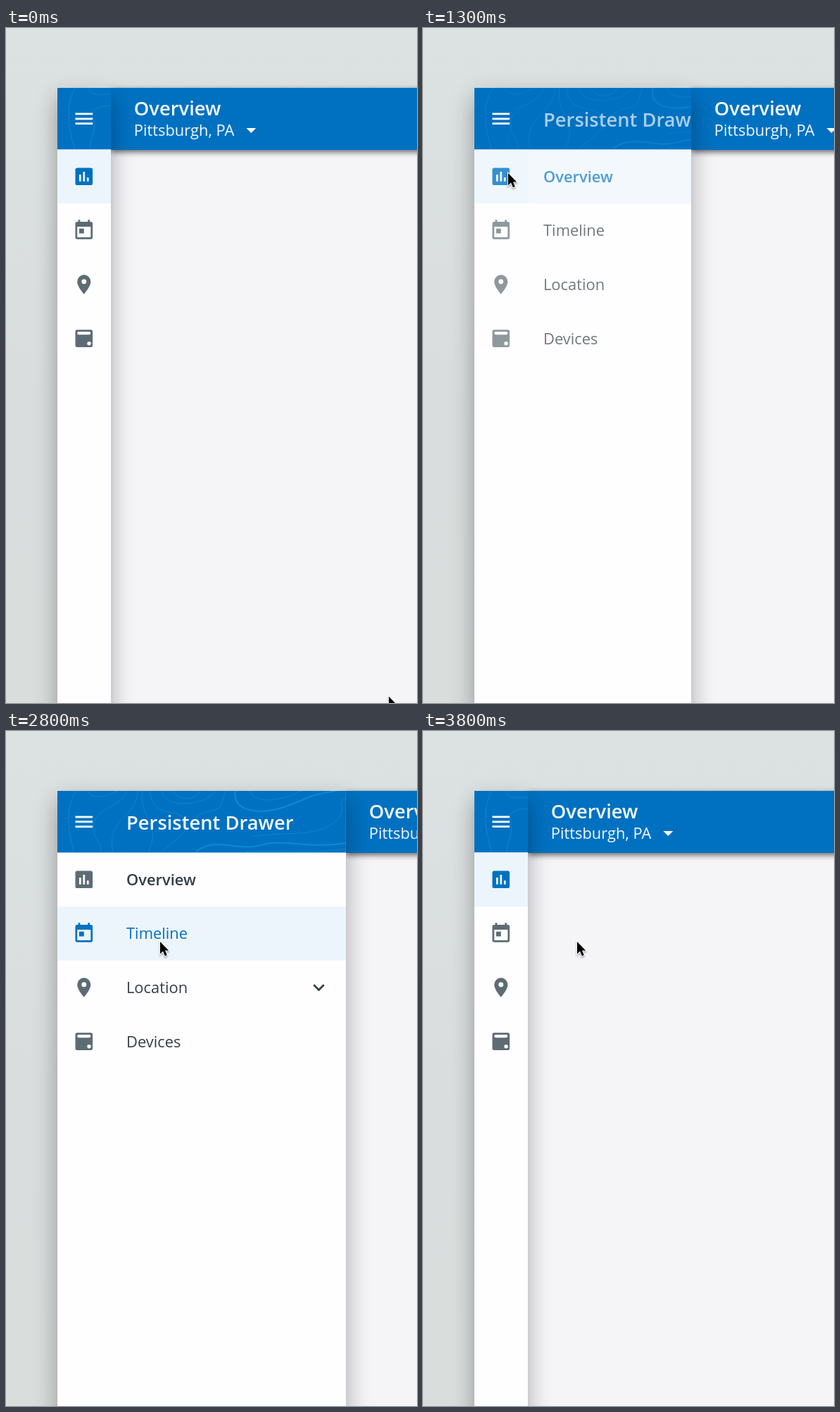
Animation of 584 by 958 pixels, one loop 4400 ms. Source, as an HTML page:

```html
<!DOCTYPE html>
<html lang="en">
<head>
<meta charset="utf-8">
<title>Persistent drawer</title>
<style>
  html, body { margin: 0; width: 100%; height: 100%; overflow: hidden; }
  body { position: relative; background: linear-gradient(#dce1e1, #d9dddd 55%, #d9dedd); }
  div, svg { position: absolute; }
  svg { overflow: visible; font-family: "Open Sans", sans-serif; }
  #page { top: 85px; width: 600px; height: 900px; background: #f5f4f7; }
  #bar { width: 100%; height: 87.5px; background: #0071c1; box-shadow: 0 3px 8px rgba(0, 0, 0, .6); }
  #drawer { left: 72.5px; top: 85px; height: 920px; overflow: hidden; background: #fefdff;
    box-shadow: 0 14px 32px rgba(0, 0, 0, .33); }
  #drawer svg { left: -72.5px; top: -85px; }
  .title { font-size: 27.36px; font-weight: 600; fill: #f4f9fd; }
  .label { font-size: 21.9px; }
  .contours path { fill: none; stroke: #1583cb; stroke-width: 1; }
  .contours .bold { stroke: #0e8bd5; stroke-width: 1.8; }
  #cursor { filter: drop-shadow(0 2px 1px rgba(0, 0, 0, .3)); }
</style>
</head>
<body>
<div id="page">
  <div id="bar">
    <svg width="500" height="88">
      <text class="title" x="32.8" y="38.5">Overview</text>
      <text class="label" x="32.8" y="67.5" fill="#f4f9fd">Pittsburgh, PA</text>
      <path d="M192.5 57h13.8l-6.9 6.9z" fill="#fff"/>
    </svg>
  </div>
</div>
<div id="drawer"><svg id="panel" width="584" height="958"></svg></div>
<svg id="cursor" width="40" height="40">
  <path id="arrow" d="M0 0V17.2L4 13.6L6.9 20.2L9.8 18.9L7 12.4H12.2Z"
    fill="#000" stroke="#fff" stroke-width="1.8" paint-order="stroke"/>
  <g id="hand" stroke-linejoin="round" stroke-linecap="round">
    <path d="M-2.4 2.6C-3.2-.6.8-1.6 1.9 1.4L4 7.6C5 6 7.3 6.4 7.7 8.2C9 6.9 10.8 7.6 11.1 9.2C12.4 8.6 13.6 9.6 13.6 11C14 15 12.6 17 11.6 19V22H2V19.6C-.5 17.4-2.6 14.8-5 12.4C-7 10-4 8.2-2 10.2L-.4 11.6Z"
      fill="#fff" stroke="#000" stroke-width="1.6"/>
    <path d="M3.6 14v4.5M6.3 14v4.5M9 14v4.5" stroke="#000" stroke-width="1.2"/>
  </g>
</svg>
<script>
const LOOP = 4400, LEFT = 72.5, UNIT = 1.368;
const ROW = 56 * UNIT, FIRST_ROW = 172.5, MINI = 56 * UNIT, WIDE = 300 * UNIT;
const BLUE = '#0071c1', GRAY = '#5d6c74', INK = '#343e43', TINT = '#ecf5fb';
const $ = id => document.getElementById(id);

const ICONS = {
  menu: 'M3 18h18v-2H3zm0-5h18v-2H3zm0-7v2h18V6z',
  chart: 'M19 3H5a2 2 0 0 0-2 2v14a2 2 0 0 0 2 2h14a2 2 0 0 0 2-2V5a2 2 0 0 0-2-2zM9 17H7v-7h2zm4 0h-2V7h2zm4 0h-2v-4h2z',
  calendar: 'M19 3h-1V1h-2v2H8V1H6v2H5a2 2 0 0 0-2 2v14a2 2 0 0 0 2 2h14a2 2 0 0 0 2-2V5a2 2 0 0 0-2-2zm0 16H5V8h14zM7 10h5v5H7z',
  pin: 'M12 2a7 7 0 0 0-7 7c0 5.25 7 13 7 13s7-7.75 7-13a7 7 0 0 0-7-7zm0 9.5a2.5 2.5 0 1 1 0-5 2.5 2.5 0 0 1 0 5z',
  device: 'M5 3h14a2 2 0 0 1 2 2v14a2 2 0 0 1-2 2H5a2 2 0 0 1-2-2V5a2 2 0 0 1 2-2zM6.5 5a1.5 1.5 0 0 0 0 3h11a1.5 1.5 0 0 0 0-3zM17.3 15.2a2 2 0 1 0 0 4 2 2 0 0 0 0-4z',
  help: 'M5 3h14a2 2 0 0 1 2 2v14a2 2 0 0 1-2 2H5a2 2 0 0 1-2-2V5a2 2 0 0 1 2-2zM11 16v2h2v-2zM8 10h2a2 2 0 1 1 3 1.6q-2 1-2 3.4h2q0-1.300 1.400-2.200A4 4 0 1 0 8 10z',
  gavel: 'M1 21h12v2H1zM5.200 8.100l2.800-2.900 14.200 14.200-2.900 2.800zM12.300 1l5.700 5.700-2.900 2.800-5.600-5.700zM3.800 9.500l5.700 5.700-2.900 2.800L1 12.300z',
  settings: 'M5 3h14a2 2 0 0 1 2 2v14a2 2 0 0 1-2 2H5a2 2 0 0 1-2-2V5a2 2 0 0 1 2-2zM12 8a4 4 0 1 0 0 8 4 4 0 0 0 0-8z',
  chevron: 'M16.590 8.590L12 13.170 7.410 8.590 6 10l6 6 6-6z'
};
const rowCenter = i => FIRST_ROW + (i + .5) * ROW;
const icon = (name, y, color = GRAY, x = LEFT + MINI / 2, id = '') =>
  `<path id="${id}" d="${ICONS[name]}" fill="${color}" fill-rule="evenodd"
    transform="translate(${x - 12 * UNIT} ${y - 12 * UNIT}) scale(${UNIT})"/>`;
const label = (text, y, id = '', weight = 400) =>
  `<text id="${id}" class="label" x="171" y="${y + 8}" font-weight="${weight}" fill="${INK}">${text}</text>`;
const tint = (i, width, id = '') =>
  `<rect id="${id}" x="${LEFT}" y="${FIRST_ROW + i * ROW}" width="${width}" height="${ROW}" fill="${TINT}"/>`;
const contours = (thin, bold = []) => '<g class="contours">' +
  thin.map(d => `<path d="${d}"/>`).join('') +
  bold.map(d => `<path class="bold" d="${d}"/>`).join('') + '</g>';

const wideContours = contours([
  'M100 85C84 108 87 140 97 172', 'M118 85C119 98 142 94 158 85',
  'M172 85C165 108 128 108 125 132S138 156 134 172', 'M187 85C186 124 142 122 152 172',
  'M205 85C205 124 244 108 254 126S236 156 222 172', 'M194 85C188 124 222 132 202 172',
  'M222 85C224 112 284 106 298 85', 'M238 85C246 101 270 98 276 85',
  'M270 122C290 108 306 118 308 96L312 85', 'M338 172C370 166 424 176 483 167',
  'M350 150C390 142 440 152 466 130S464 102 483 96', 'M346 85C352 104 390 100 420 85'
], [
  'M270 171C300 149 330 172 362 162S430 168 483 159',
  'M326 85C322 112 352 118 384 111S424 90 470 85'
]);
const miniContours = contours([
  'M98 85C85 108 87 138 98 172', 'M118 85C120 97 132 94 149 94',
  'M149 110C120 112 122 120 125 134S118 158 120 172'
]);

// Each secondary entry trades places with a collapsed entry in the narrow drawer.
const SWAPS = [['calendar', 'help', 'Help'], ['pin', 'gavel', 'Legal'], ['device', 'settings', 'Settings']];
const swapGroup = (kind, draw) =>
  SWAPS.map((s, i) => `<g id="${kind}${i}">${draw(s)}</g>`).join('');

$('panel').innerHTML = `
  <rect x="${LEFT}" y="85" width="${WIDE}" height="87.5" fill="${BLUE}"/>
  <g id="wide">
    ${wideContours}
    <text class="title" x="171" y="139.500">Persistent Drawer</text>
    ${tint(0, WIDE, 'overviewTint')}${tint(1, WIDE, 'timelineTint')}
    ${icon('chart', rowCenter(0), GRAY, undefined, 'overviewIcon')}${label('Overview', rowCenter(0), 'overviewText', 600)}
    ${icon('calendar', rowCenter(1), GRAY, undefined, 'timelineIcon')}${label('Timeline', rowCenter(1), 'timelineText')}
    ${icon('pin', rowCenter(2))}${label('Location', rowCenter(2))}
    ${icon('chevron', rowCenter(2), GRAY, 444.5, 'chevron')}
    ${icon('device', rowCenter(3))}${label('Devices', rowCenter(3))}
    ${swapGroup('extra', s => icon(s[1], 0) + label(s[2], 0))}
  </g>
  <g id="mini">
    ${miniContours}${tint(0, MINI)}${icon('chart', rowCenter(0), BLUE)}
    ${swapGroup('small', s => icon(s[0], 0))}
  </g>
  ${icon('menu', 128.800, '#fff')}`;

// time, x, y of the pointer tip
const PATH = [
  [0, 544, 949], [100, 537, 934], [200, 500, 852], [300, 415, 672], [400, 300, 440],
  [500, 215, 288], [600, 173, 225], [700, 143, 213], [900, 121, 210], [1200, 121, 206],
  [1500, 121, 206], [1600, 136, 229], [1700, 166, 264], [1800, 190, 285],
  [2000, 204, 293], [2400, 219, 299], [LOOP, 219, 299]
];
const lerp = (a, b, p) => a + (b - a) * p;
const easeOut = (t, start) => 1 - (1 - Math.min(1, Math.max(0, (t - start) / 300))) ** 2.9;
const mix = (a, b, p) => `color-mix(in srgb, ${b} ${p * 100}%, ${a})`;

function pointerAt(t) {
  const i = PATH.findIndex(k => k[0] > t);
  const [a, b] = [PATH[i - 1], PATH[i]];
  const p = (t - a[0]) / (b[0] - a[0]);
  return [lerp(a[1], b[1], p), lerp(a[2], b[2], p)];
}

function draw(t) {
  const open = easeOut(t, 1200) - easeOut(t, 2900);
  const picked = easeOut(t, 2500);
  const width = lerp(MINI, WIDE, open);
  $('drawer').style.width = width + 'px';
  $('page').style.left = LEFT + width + 'px';
  $('wide').style.opacity = open;
  $('mini').style.opacity = 1 - open;
  SWAPS.forEach((_, i) => {
    const y = lerp(rowCenter(i + 1), 1356 - i * ROW, open);
    for (const kind of ['extra', 'small']) $(kind + i).setAttribute('transform', `translate(0 ${y})`);
  });

  $('overviewTint').style.opacity = 1 - picked;
  $('timelineTint').style.opacity = picked;
  $('overviewIcon').style.fill = mix(BLUE, GRAY, picked);
  $('overviewText').style.fill = mix(BLUE, INK, picked);
  $('timelineIcon').style.fill = mix(GRAY, BLUE, picked);
  $('timelineText').style.fill = mix(INK, BLUE, picked);
  $('chevron').style.fill = mix(GRAY, INK, picked);

  const [x, y] = pointerAt(t);
  const hovering = (t >= 690 && t < 1200) || (t >= 1680 && t < 2500);
  $('cursor').style.transform = `translate(${x}px, ${y}px)`;
  $('hand').style.display = hovering ? '' : 'none';
  $('arrow').style.display = hovering ? 'none' : '';
}

const start = performance.now();
function tick() {
  draw((performance.now() - start) % LOOP);
  requestAnimationFrame(tick);
}
tick();
</script>
</body>
</html>
```
